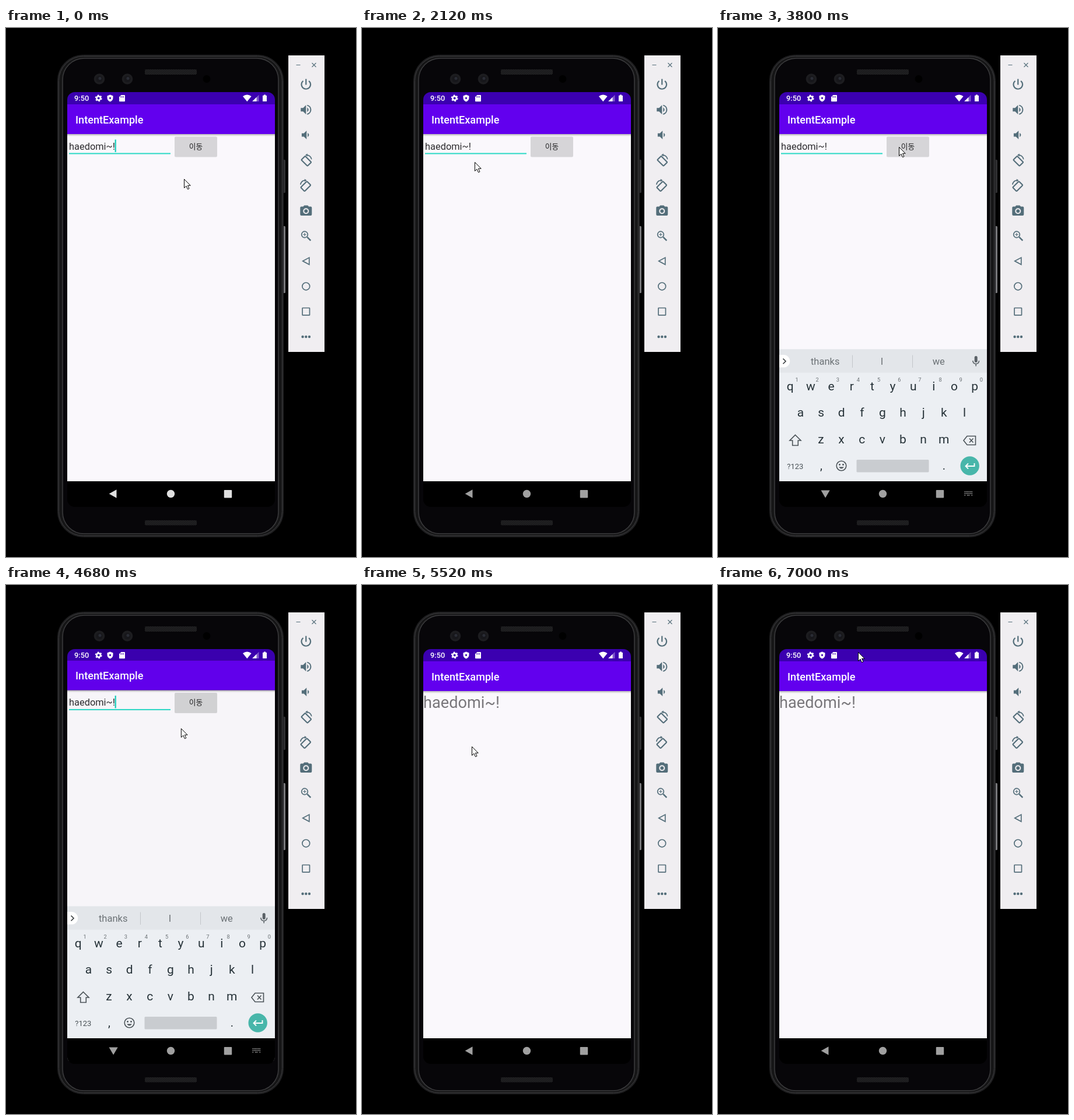
Write an HTML page that moves like this. It is 600 px wide and 908 px high and loops after 7040 ms.

```html
<!DOCTYPE html>
<html lang="ko">
<head>
<meta charset="utf-8">
<title>IntentExample</title>
<style>
  html, body { margin: 0; width: 100%; height: 100%; overflow: hidden; background: #000; }
  svg { display: block; width: 600px; height: 908px; }
  text { font-family: Roboto, "Noto Sans CJK KR", "Noto Sans CJK", sans-serif; }
  .mid { text-anchor: middle; }
  .line { fill: none; stroke: #546e7a; stroke-width: 1.7; }
</style>
</head>
<body>
<svg viewBox="0 0 600 908" xmlns="http://www.w3.org/2000/svg">
  <defs>
    <clipPath id="screen"><rect x="105" y="110" width="356" height="712" rx="13"/></clipPath>
    <clipPath id="reveal"><rect id="revealBox" x="105" width="356" height="720"/></clipPath>
    <clipPath id="btnClip"><rect x="289" y="186.500" width="73" height="34" rx="2"/></clipPath>
    <linearGradient id="shade" x1="0" y1="0" x2="0" y2="1">
      <stop offset="0" stop-color="#000" stop-opacity=".28"/>
      <stop offset="1" stop-color="#000" stop-opacity="0"/>
    </linearGradient>
    <pattern id="mesh" width="3" height="3" patternUnits="userSpaceOnUse">
      <rect width="3" height="3" fill="#262628"/><path d="M0 3 3 0" stroke="#0d0d0e"/>
    </pattern>
    <g id="window">
      <rect x="105" y="182" width="356" height="610" fill="#faf8fc"/>
      <rect x="105" y="182" width="356" height="4" fill="url(#shade)"/>
      <rect x="105" y="100" width="356" height="31" fill="#3b00b0"/>
      <rect x="105" y="131" width="356" height="51" fill="#6200ee"/>
      <text x="119" y="163.500" font-size="18.100" font-weight="500" fill="#fff">IntentExample</text>
    </g>
  </defs>
  <rect width="600" height="908"/>

  <g id="phone">
    <rect x="475" y="226" width="4" height="57" rx="1.500" fill="#2f2f31"/>
    <rect x="475" y="340" width="4" height="115" rx="1.500" fill="#77777a"/>
    <rect x="88.500" y="46.500" width="387" height="827" rx="44" fill="#161617" stroke="#29292b"/>
    <rect x="90.500" y="48.500" width="383" height="823" rx="42" fill="none" stroke="#434345"/>
    <rect x="97" y="52" width="370" height="816" rx="37" fill="#070609" stroke="#3c3c3e" stroke-width="1.500"/>
    <rect x="238" y="71" width="89" height="9" rx="2" fill="url(#mesh)"/>
    <rect x="238" y="845" width="89" height="8.500" rx="2" fill="url(#mesh)"/>
    <g id="lenses"></g>
    <circle cx="344" cy="87.500" r="6.500" fill="#000"/>
  </g>

  <g clip-path="url(#screen)">
    <g id="first">
      <use href="#window"/>
      <rect x="108" y="214.500" width="174" height="2" fill="#2bd9c6"/>
      <text x="108" y="208.700" font-size="16.400" fill="#2d2c2f">haedomi~!</text>
      <rect id="caret" x="186.600" y="191.500" width="2.200" height="21.500" fill="#14cdba"/>
      <rect x="289" y="187.500" width="73" height="34" rx="2" fill="#000" opacity=".14"/>
      <rect x="289" y="186.500" width="73" height="34" rx="2" fill="#d6d5d8"/>
      <circle id="ripple" cx="312" cy="204" clip-path="url(#btnClip)"/>
      <text class="mid" x="325.500" y="208" font-size="12.700" fill="#1f1f21">이동</text>
    </g>
    <rect id="dim" x="105" y="100" width="356" height="678"/>
    <g id="clipped" clip-path="url(#reveal)">
      <g id="second">
        <use href="#window"/>
        <text x="105" y="210.700" font-size="27.200" fill="#79777b">haedomi~!</text>
      </g>
    </g>
    <g fill="#fff">
      <text x="117" y="125.300" font-size="12.800" font-weight="500">9:50</text>
      <circle cx="158.700" cy="120.500" r="3.300" fill="none" stroke="#fff" stroke-width="2.600"/>
      <circle cx="158.700" cy="120.500" r="5" fill="none" stroke="#fff" stroke-width="2" stroke-dasharray="2.618"/>
      <path d="M178.500 114.500l5 2v3.500c0 3-2 5.500-5 6.500-3-1-5-3.500-5-6.500v-3.500z"/>
      <path d="M176.800 119h3.400l-.8 3h-1.800z" fill="#3b00b0"/>
      <path d="M197.500 115h5.500q1 0 1 1v9.200q0 1-1 1h-8q-1 0-1-1v-6.700z"/>
      <path d="M196.800 117v2.500m2.300-2.500v2.500m2.300-2.500v2.500" stroke="#3b00b0"/>
      <path d="M406 117.300q7.300-5.600 14.600 0l-7.300 8.900z"/>
      <path d="M433.500 114.700v11.300h-11.300z" opacity=".35"/>
      <path d="M429.500 118.700v7.300h-7.300z"/>
      <path d="M442 114.500h3v1.200h1.300q.7 0 .7.700v9q0 .7-.7.700h-5.600q-.7 0-.7-.7v-9q0-.7.700-.7h1.300z"/>
    </g>
    <rect x="105" y="778" width="356" height="44"/>
    <g id="keyboard"></g>
    <g id="nav">
      <path id="back"/>
      <circle cx="282.500" cy="799.500" r="6.700"/>
      <rect x="373.800" y="793" width="13.400" height="13.400" rx="1"/>
      <path id="kbIcon" d="M422.500 796h14m-14 3h14m-14 3h2m2.500 0h5m2.500 0h2" fill="none" stroke="#a0a0a0" stroke-width="1.700" stroke-dasharray="1.600 .8"/>
    </g>
  </g>

  <g id="panel">
    <rect x="484" y="47" width="62" height="509" fill="#f0eef1"/>
    <path d="M497.500 63.500h7m20-3.500 7 7m0-7-7 7" class="line" style="stroke-width:1.100"/>
    <g id="tools"></g>
  </g>

  <path id="arrow" d="M.5 .5v15l3.500-3.300 2.500 5.600 2.500-1.100-2.500-5.400h4.700z" fill="#fff" stroke="#000"/>
</svg>
<script>
const LOOP = 7040, STEP = 40;
const el = id => document.getElementById(id);
const clamp = x => Math.max(0, Math.min(1, x));
const span = (t, a, b) => clamp((t - a) / (b - a));
const out = (x, p) => 1 - (1 - x) ** p;
const shift = (node, x, y) => node.setAttribute('transform', `translate(${x.toFixed(2)} ${y.toFixed(2)})`);
const show = (node, on) => node.setAttribute('visibility', on ? 'visible' : 'hidden');
const label = (s, x, y, size, fill) =>
  `<text class="mid" x="${x}" y="${y}" font-size="${size}" fill="${fill}">${s}</text>`;

function buildLenses() {
  el('lenses').innerHTML = [160, 208].map(x =>
    `<circle cx="${x}" cy="87.5" r="9.3" fill="#1d1d20"/>
     <circle cx="${x}" cy="87.5" r="5.5" fill="#17171b"/>
     <circle cx="${x + 1}" cy="86.5" r="2.5" fill="#2a2c35"/>`).join('');
}

function buildTools() {
  const speaker = 'M-9-3h4l5-5v16l-5-5h-4z';
  const tilt = s => `<g transform="scale(${s} 1)">
    <rect x="-4.700" y="-7.500" width="9.400" height="15" rx="1.300" transform="translate(.5 1.500) rotate(-45)" class="line" style="stroke-width:2.100"/>
    <path d="M1-8.800Q8-8.500 9.500-1.500" class="line"/>
    <path d="M2.500-11.300v4.800l-3.800-2.300z"/></g>`;
  const icons = [
    '<path d="M-4.800-6.200a7.800 7.800 0 1 0 9.600 0M0-9.500v10" class="line" style="stroke-width:2.200"/>',
    `<path d="${speaker}M2-4q5 4 0 8z"/><path d="M2-7.700a7.900 7.900 0 0 1 0 15.400" class="line" style="stroke-width:2"/>`,
    `<path d="${speaker}M2-4q5 4 0 8z" transform="translate(1 0) scale(.93)"/>`,
    tilt(1),
    tilt(-1),
    '<path d="M-3-9h6l1.800 2h3.200q2 0 2 2V6.500q0 2-2 2h-16q-2 0-2-2V-5q0-2 2-2h3.200z"/><circle r="4" cy=".8" fill="#546e7a" stroke="#f0eef1" stroke-width="2"/>',
    '<circle cx="-2.300" cy="-2.300" r="5.300" class="line"/><path d="M2 2l6 6" class="line" style="stroke-width:2.500"/><path d="M-5-2.300h5.400m-2.700-2.700v5.400" class="line" style="stroke-width:1.200"/>',
    '<path d="M-5.500 0 5.500-6V6z" class="line"/>',
    '<circle r="6.400" class="line"/>',
    '<rect x="-6.200" y="-6.200" width="12.400" height="12.400" rx=".5" class="line"/>',
    '<circle cx="-5.700" r="2.200"/><circle r="2.200"/><circle cx="5.700" r="2.200"/>'
  ];
  el('tools').innerHTML = icons.map((s, i) =>
    `<g transform="translate(514.300 ${97 + i * 43.3})" fill="#546e7a">${s}</g>`).join('');
}

function buildKeyboard() {
  const ink = '#263238', grey = '#6b7175';
  const row = (keys, x, y) => [...keys].map((k, i) => label(k, x + i * 35.15, y, 21, ink)).join('');
  const digits = [...'1234567890'].map((k, i) => label(k, 135 + i * 35.15, 607.3, 9.3, grey)).join('');
  el('keyboard').innerHTML = `
    <rect x="105" y="778" width="356" height="54"/>
    <rect x="105" y="551.500" width="356" height="226.500" fill="#eceff3"/>
    <rect x="105" y="551.500" width="356" height="40" fill="#e3e6ea"/>
    <path d="M105 561h7.500a10.800 10.800 0 0 1 0 21.600H105z" fill="#fff"/>
    <path d="M111.500 567.500l4.500 4.500-4.500 4.500" fill="none" stroke="#3c4043" stroke-width="1.700"/>
    ${label('thanks', 183.7, 578, 16.5, grey)}${label('I', 281, 578, 16.5, grey)}${label('we', 378.3, 578, 16.5, grey)}
    <path d="M230.500 561.500v21.500m103-21.500v21.500" stroke="#c2c6ca"/>
    <rect x="439.700" y="563" width="5" height="11" rx="2.500" fill="#5a6166"/>
    <path d="M436.800 571q.5 5.500 5.400 5.500t5.400-5.500m-5.400 5.500v4" fill="none" stroke="#5a6166" stroke-width="1.600"/>
    ${row('qwertyuiop', 123.8, 622)}${digits}${row('asdfghjkl', 141.4, 667.3)}${row('zxcvbnm', 176.4, 713)}
    <path d="M132.500 698.500l9.500 9.500h-4.700v8.500h-9.600v-8.500H123z" fill="none" stroke="#4a5257" stroke-width="1.600"/>
    <path d="M427 700.500h14.500v15H427l-6-7.500zm4 4 6.500 7m0-7-6.500 7" fill="none" stroke="#4a5257" stroke-width="1.600"/>
    ${label('?123', 132.3, 756.5, 13, '#4a5257')}${label(',', 177, 758, 20, ink)}${label('.', 387.5, 758, 20, ink)}
    <circle cx="211.500" cy="751.500" r="8.300" fill="none" stroke="#4a5257" stroke-width="1.600"/>
    <circle cx="208.500" cy="749.500" r="1.400" fill="#4a5257"/><circle cx="214.500" cy="749.500" r="1.400" fill="#4a5257"/>
    <path d="M207 753.500q4.500 5.500 9 0z" fill="#4a5257"/>
    <rect x="237.500" y="741" width="124" height="21.500" rx="1.500" fill="#c9ccd0"/>
    <circle cx="431.700" cy="751.500" r="16.200" fill="#48b6aa"/>
    <path d="M439.500 747v5h-15m4.500-4.500-4.500 4.500 4.500 4.500" fill="none" stroke="#fff" stroke-width="1.900"/>`;
}

// Pointer stations: time, x, y
const path = [
  [0, 305, 259], [120, 305, 258], [400, 302, 243], [640, 298, 222], [740, 288, 196],
  [880, 227, 144], [1020, 152, 135], [1160, 110, 172], [1300, 155, 224], [1440, 238, 215],
  [1540, 251, 180], [1660, 200, 150], [1780, 120, 165], [1880, 81, 215], [1980, 120, 258],
  [2060, 170, 262], [2120, 193, 230], [2200, 197, 225], [2320, 188, 210],
  [3480, 188, 210], [3760, 310, 204], [4480, 310, 204],
  [4840, 280, 276], [5000, 170, 250], [5160, 66, 215], [5340, 90, 262], [5520, 188, 277],
  [5660, 268, 252], [5780, 285, 195], [5920, 210, 124], [6060, 90, 145], [6180, 32, 210],
  [6320, 75, 246], [6460, 200, 249], [6600, 314, 190], [6720, 300, 128], [6840, 256, 106],
  [6960, 240, 114], [7000, 240, 115], [7040, 240, 115]
];
const slope = (i, k) => (path[i + 1][k] - path[i][k]) / (path[i + 1][0] - path[i][0]);
function tangent(i, k) {
  if (i === 0 || i === path.length - 1) return 0;
  const a = slope(i - 1, k), b = slope(i, k);
  return a * b <= 0 ? 0 : 2 * a * b / (a + b);
}
function pointer(t) {
  let i = 0;
  while (i < path.length - 2 && path[i + 1][0] <= t) i++;
  const [p, q] = [path[i], path[i + 1]], h = q[0] - p[0], u = (t - p[0]) / h, v = 1 - u;
  return [1, 2].map(k =>
    v * v * (1 + 2 * u) * p[k] + u * u * (3 - 2 * u) * q[k] +
    h * u * v * (v * tangent(i, k) - u * tangent(i + 1, k)));
}

const caretOn = t => {
  if (t >= 4240) return true;
  if (t >= 2720) return t >= 3240 && t < 3740;
  return (t + 480) % 1000 < 500;
};

function draw(t) {
  show(el('caret'), caretOn(t));

  const r = span(t, 4240, 4480);
  el('ripple').setAttribute('r', 12 + 50 * out(r, 2));
  el('ripple').setAttribute('opacity', t < 4240 ? 0 : .16 * (1 - span(t, 4440, 4700)));

  const x = span(t, 4640, 5065), move = out(x, 1.26), open = out(x, 3.3);
  shift(el('first'), 0, -13.5 * move);
  show(el('first'), x < 1);
  show(el('dim'), x > 0 && x < 1);
  el('dim').setAttribute('opacity', .1 * move);
  show(el('clipped'), x > 0);
  el('revealBox').setAttribute('y', 822 - 717 * open);
  shift(el('second'), 0, 29 * (1 - move));
  if (x === 1) show(el('caret'), false);

  const rise = out(span(t, 3440, 3720), 2.2), fall = span(t, 4780, 4960);
  const kb = el('keyboard');
  show(kb, t >= 3440 && fall < 1);
  kb.setAttribute('opacity', rise * (1 - fall * .3 - fall * fall * .7));
  shift(kb, 0, 45 * (1 - rise) + 15 * fall);

  const typing = t >= 3240 && t < 4760;
  const tone = Math.round(224 - 64 * span(t, 0, 520));
  el('nav').setAttribute('fill', `rgb(${tone},${tone},${tone})`);
  el('back').setAttribute('d', typing ? 'M176.500 793.500h15.200l-7.600 13z' : 'M176.700 799.500l12.800-7.300v14.600z');
  show(el('kbIcon'), typing);

  shift(el('arrow'), ...pointer(t));
}

buildLenses();
buildTools();
buildKeyboard();
const start = performance.now();
function tick() {
  const t = (performance.now() - start) % LOOP;
  draw(Math.floor(t / STEP) * STEP);
  requestAnimationFrame(tick);
}
draw(0);
requestAnimationFrame(tick);
</script>
</body>
</html>
```
